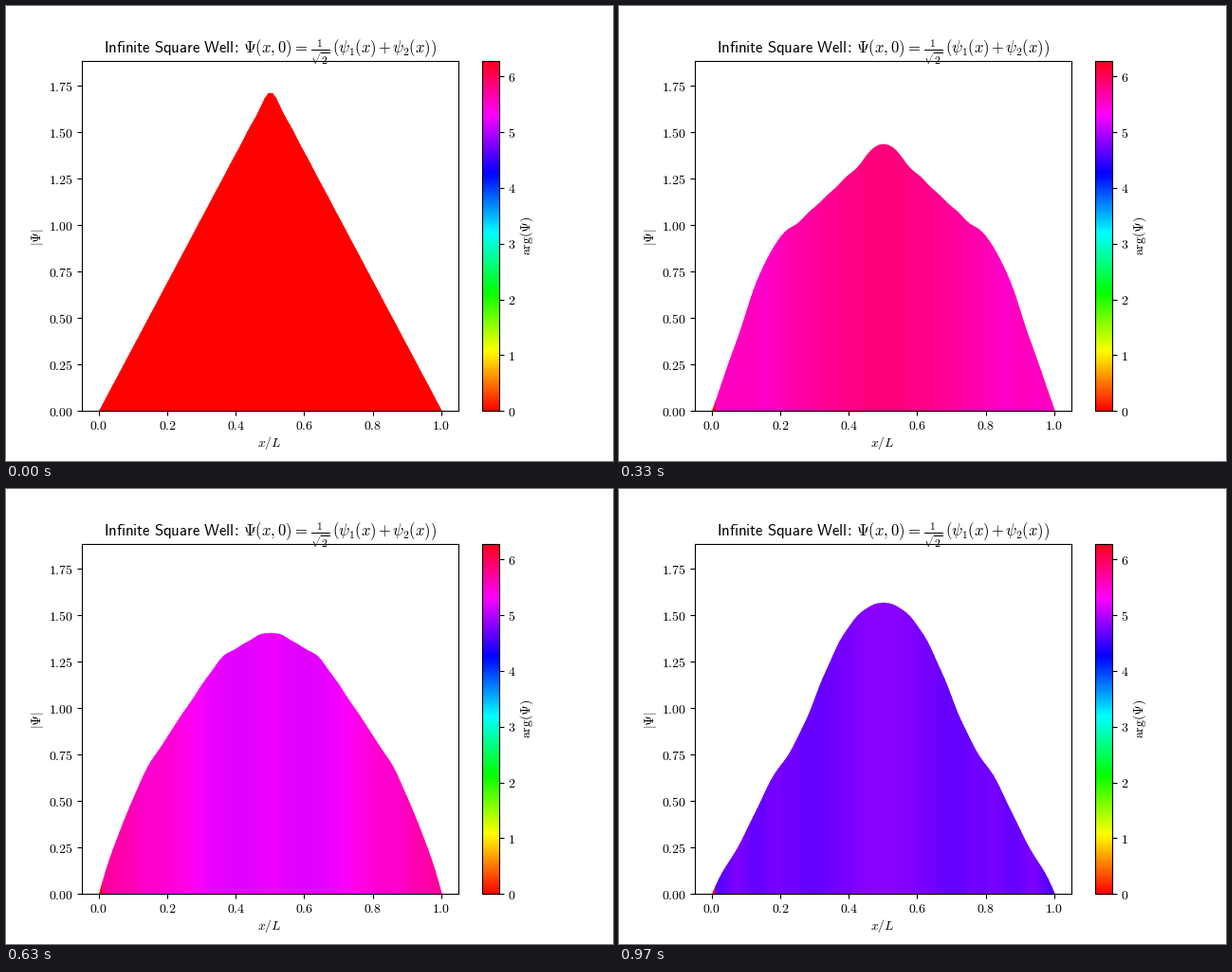
Write a matplotlib script that moves like this. It is 640 px wide and 480 px high and loops after 1.01 s.

```python
import numpy as np
import matplotlib.pyplot as plt
from matplotlib.animation import FuncAnimation
from matplotlib.cm import ScalarMappable
from matplotlib.collections import PolyCollection
from matplotlib.colors import Normalize
from matplotlib.ticker import StrMethodFormatter

plt.rcParams["mathtext.fontset"] = "cm"

WIDTH, HEIGHT, DPI = 640, 480, 100
TICK_MS, LOOP_MS = 10, 1010
STEPS, STEP_MS = 30, 100 / 3
PHASE_STEP = 2 * np.pi / 119

# Triangular initial state expanded in the odd eigenstates of the well.
x = np.linspace(0, 1, 100)
n = np.arange(1, 40, 2)
coeffs = np.sqrt(3) * 8 / np.pi**2 * (-1.0) ** ((n - 1) // 2) / n**2
modes = coeffs[:, None] * np.sin(np.pi * np.outer(n, x))
triangle = np.sqrt(3) * (1 - np.abs(2 * x - 1))

cmap = plt.get_cmap("hsv")
norm = Normalize(0, 2 * np.pi)


def wave(step):
    return np.exp(-1j * n**2 * PHASE_STEP * step) @ modes


def quads(height):
    """One quadrilateral per interval of x, from the axis to the curve."""
    return [
        [(a, 0), (a, ha), (b, hb), (b, 0)]
        for a, b, ha, hb in zip(x, x[1:], height, height[1:])
    ]


fig, ax = plt.subplots(figsize=(WIDTH / DPI, HEIGHT / DPI), dpi=DPI)
strips = [PolyCollection([quad], linewidths=1) for quad in quads(triangle)]
for strip in strips:
    ax.add_collection(strip, autolim=False)
ax.set_xlim(-0.05, 1.05)
ax.set_ylim(0, 1.1 * triangle.max())
ax.set_xticks(np.arange(0, 1.1, 0.2))
ax.set_yticks(np.arange(0, 1.8, 0.25))
ax.xaxis.set_major_formatter(StrMethodFormatter("${x:.1f}$"))
ax.yaxis.set_major_formatter(StrMethodFormatter("${x:.2f}$"))
ax.tick_params(axis="x", pad=2.5)
ax.tick_params(axis="y", pad=3)
ax.set_title(
    r"$\mathsf{Infinite\ Square\ Well}\!\mathsf{:}\,"
    r"\Psi(x,0)\hspace{0.05}=\hspace{0.05}\frac{1}{\sqrt{2}}\,"
    r"(\psi_1\hspace{-0.06}(x)\hspace{-0.04}+\hspace{-0.04}"
    r"\psi_2\hspace{-0.06}(x))$",
    y=1.0,
)

bar = fig.colorbar(ScalarMappable(norm, cmap), ax=ax)
bar.set_ticks(range(7))
bar.ax.yaxis.set_major_formatter(StrMethodFormatter("${x:.0f}$"))
bar.ax.tick_params(pad=3)


def label(px, py, text, rotation=0):
    fig.text(px / WIDTH, 1 - py / HEIGHT, text, rotation=rotation,
             ha="center", va="center")


label(278.4, 461, "$x/L$")
label(33.5, 243.5, r"$|\Psi|$", 90)
label(549, 242, r"$\mathrm{arg}(\Psi)$", 90)


def update(frame):
    step = min(STEPS - 1, int((frame * TICK_MS + 5) / STEP_MS))
    psi = wave(step)
    colors = cmap(norm(np.angle(psi[:-1]) % (2 * np.pi)))
    for strip, quad, color in zip(strips, quads(np.abs(psi)), colors):
        strip.set_verts([quad])
        strip.set_color(color)
    return strips


anim = FuncAnimation(fig, update, frames=LOOP_MS // TICK_MS, interval=TICK_MS,
                     init_func=lambda: update(0), repeat=True, repeat_delay=0)
plt.show()
```
